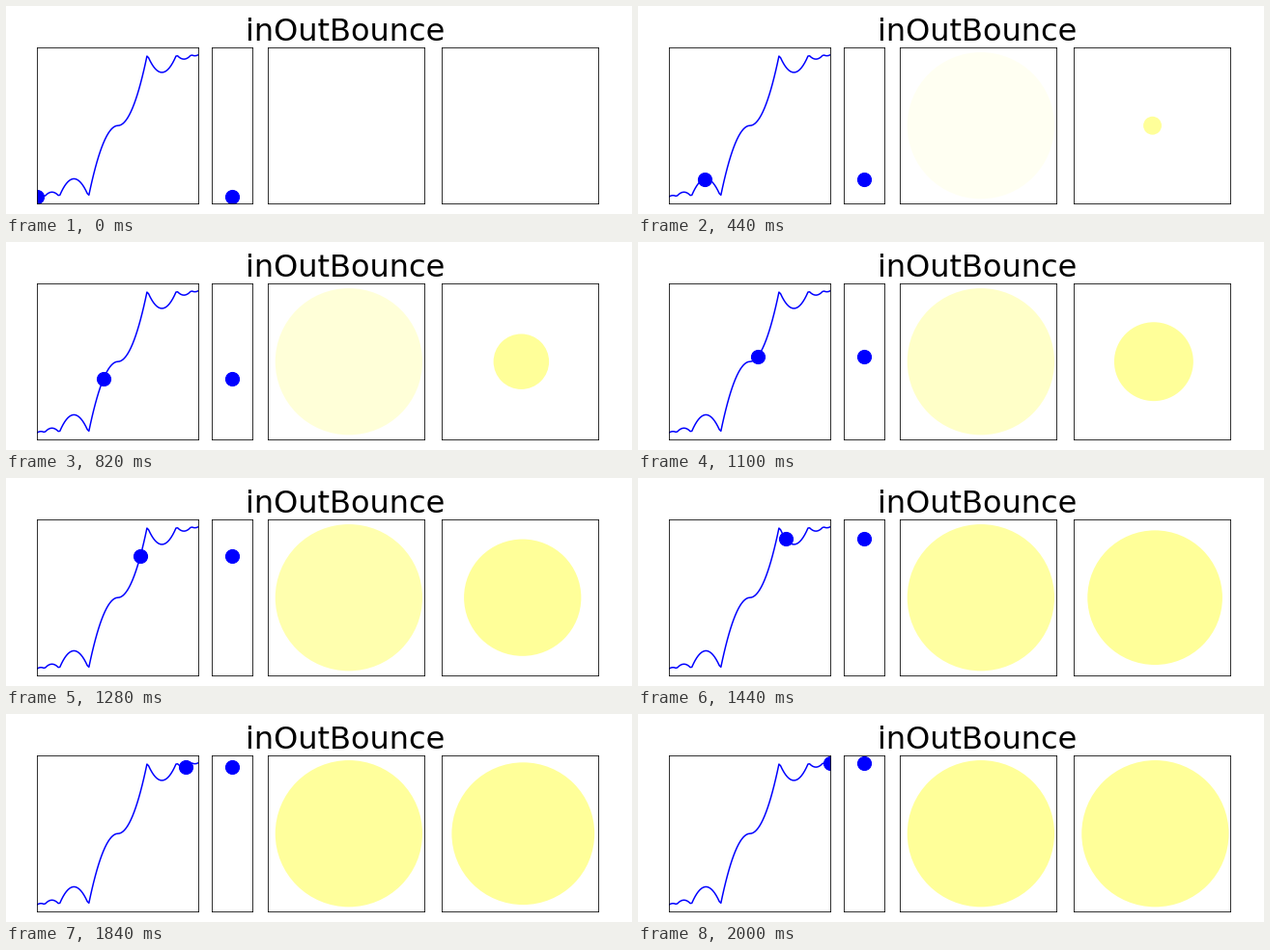
Recreate the animation shown at these times as a matplotlib script. Size 648 by 216 pixels, loop 2.02 s.

```python
import numpy as np
import matplotlib.pyplot as plt
from matplotlib.animation import FuncAnimation
from matplotlib.patches import Circle

plt.rcParams["font.family"] = "DejaVu Sans"

FRAMES = 101
BLUE = "#0000ff"
YELLOW = "#ffff99"


def out_bounce(t):
    k = 7.5625
    if t < 1 / 2.75:
        return k * t**2
    if t < 2 / 2.75:
        return k * (t - 1.5 / 2.75) ** 2 + 0.75
    if t < 2.5 / 2.75:
        return k * (t - 2.25 / 2.75) ** 2 + 0.9375
    return k * (t - 2.625 / 2.75) ** 2 + 0.984375


def in_out_bounce(t):
    if t < 0.5:
        return (1 - out_bounce(1 - 2 * t)) / 2
    return (1 + out_bounce(2 * t - 1)) / 2


ts = np.linspace(0, 1, FRAMES)
ys = np.array([in_out_bounce(t) for t in ts])

fig, (ax_curve, ax_move, ax_fade, ax_zoom) = plt.subplots(
    1, 4, figsize=(9, 3), dpi=72,
    gridspec_kw=dict(width_ratios=[4, 1, 4, 4], left=0.05, right=0.95,
                     bottom=0.05, top=0.8, wspace=0.1))

ax_fade.set_title("inOutBounce", fontsize=32, pad=6)
ax_curve.plot(ts, ys, color=BLUE, lw=1.5)


def add_dot(ax):
    return ax.scatter([0.5], [0], s=200, color=BLUE, zorder=2)


def add_disc(ax):
    return ax.add_patch(Circle((0.52, 0.5), 0.47, fc=YELLOW, ec="none"))


tracer, mover = add_dot(ax_curve), add_dot(ax_move)
fader, zoomer = add_disc(ax_fade), add_disc(ax_zoom)

for ax in (ax_curve, ax_move, ax_fade, ax_zoom):
    ax.set(xticks=[], yticks=[], xlim=(0, 1), ylim=(0, 1))
for ax in (ax_curve, ax_move):
    ax.set_ylim(-0.05, 1.05)
for ax in (ax_fade, ax_zoom):
    ax.set_aspect("equal")


def update(i):
    t, y = ts[i], ys[i]
    tracer.set_offsets([(t, y)])
    mover.set_offsets([(0.5, y)])
    fader.set_alpha(min(max(y, 0), 1))
    # scale about the centre of the panel
    zoomer.center = (0.5 + 0.02 * y, 0.5)
    zoomer.set_radius(0.47 * y)
    zoomer.set_visible(y > 0)
    return tracer, mover, fader, zoomer


anim = FuncAnimation(fig, update, frames=FRAMES, interval=20,
                     repeat=True, repeat_delay=0)
plt.show()
```
